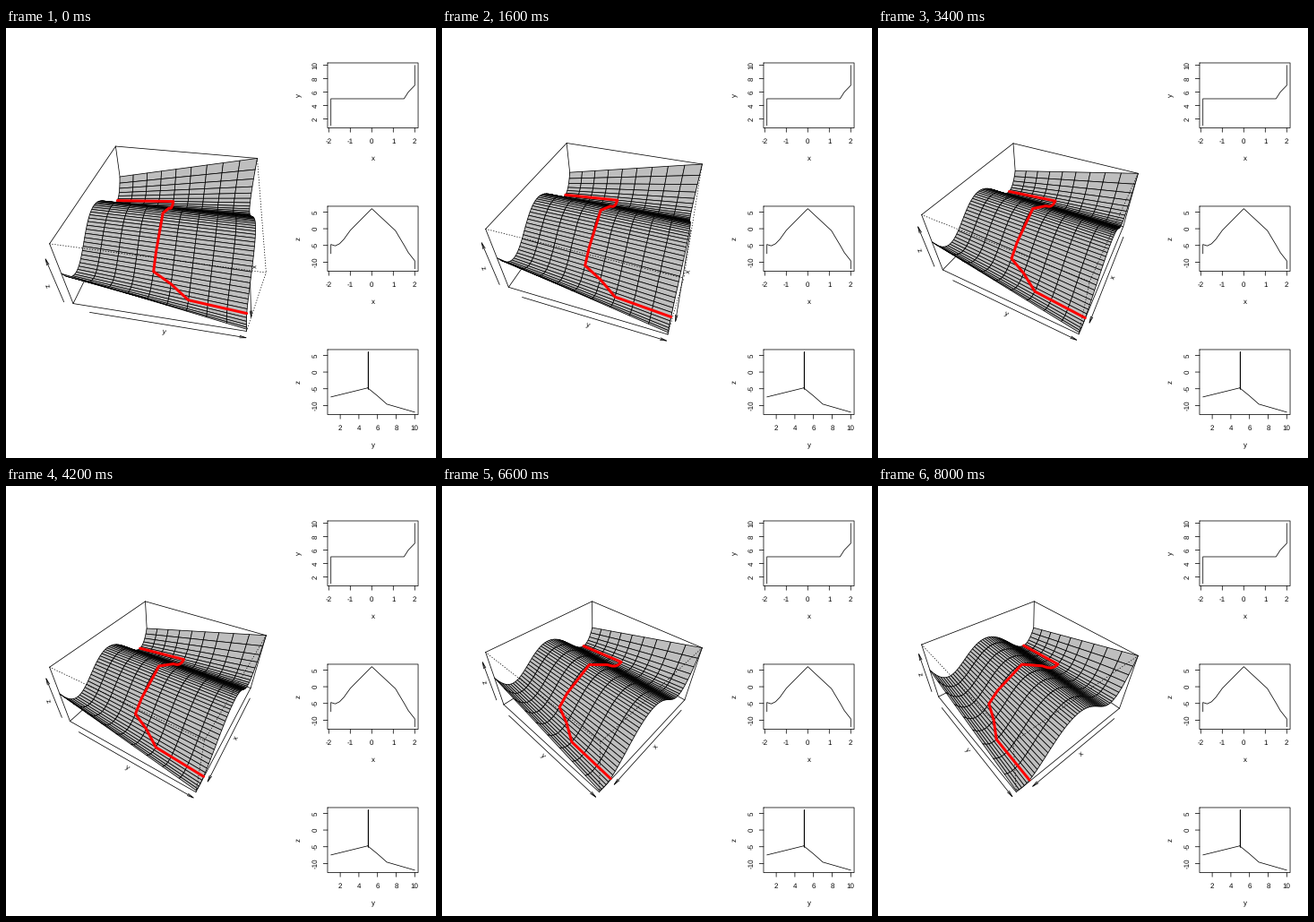
Recreate the animation shown at these times as a matplotlib script. Size 480 by 480 pixels, loop 8.2 s.

```python
import itertools

import matplotlib.pyplot as plt
import numpy as np
from matplotlib.animation import FuncAnimation
from matplotlib.collections import PolyCollection

SIZE, DPI = 480, 72
FRAMES, STEP = 41, 200
THIN = 0.75
LINE = 0.66 * 14.4            # height of one margin line
CHAR = 8                      # font size
MAR = np.array([5.1, 4.1, 4.1, 2.1]) * LINE   # bottom, left, top, right
PHI, EXPAND, EYE = np.radians(42), 0.5, 2 + np.sqrt(3)

plt.rcParams.update({"font.family": "Liberation Sans", "font.size": CHAR,
                     "text.hinting": "none", "path.snap": False,
                     "lines.scale_dashes": False})

fig = plt.figure(figsize=(SIZE / DPI, SIZE / DPI), dpi=DPI, facecolor="white")
ax = fig.add_axes([0, 0, 1, 1])
ax.set(xlim=(0, SIZE), ylim=(SIZE, 0))
ax.axis("off")


def height(x, y):
    return x**4 - 7 * x**2 + 6 + x - 0.1 * x**3 * y


gx, gy = np.linspace(-2.5, 2.5, 51), np.arange(1, 11)
GX, GY = np.meshgrid(gx, gy, indexing="ij")
GZ = height(GX, GY)
LO = np.array([gx[0], gy[0], GZ.min()])
HI = np.array([gx[-1], gy[-1], GZ.max()])

px = np.array([-1.9, -1.9, -1.7, -1.5, -1.3, -1, 0, 1.1, 1.5, 1.7, 2, 2])
py = np.array([1, 5, 5, 5, 5, 5, 5, 5, 5, 6, 7, 10])
pz = height(px, py)


def line(x=(), y=(), **kw):
    style = {"color": "black", "lw": THIN, "solid_capstyle": "round",
             "solid_joinstyle": "round"}
    return ax.plot(x, y, **{**style, **kw})[0]


def text(x, y, s, angle=0):
    return ax.text(x, y, s, ha="center", va="baseline", rotation=angle,
                   rotation_mode="anchor")


def panel(row, x, y, names, xticks, yticks):
    left, right = 320 + MAR[1], SIZE - MAR[3]
    top, bottom = 160 * row + MAR[2], 160 * (row + 1) - MAR[0]

    def scale(v, data, a, b):
        lo, hi = data.min(), data.max()
        pad = 0.04 * (hi - lo)
        return a + (np.asarray(v) - lo + pad) / (hi - lo + 2 * pad) * (b - a)

    def sx(v):
        return scale(v, x, left, right)

    def sy(v):
        return scale(v, y, bottom, top)

    line(sx(x), sy(y))
    line([left, right, right, left, left], [top, top, bottom, bottom, top])
    for v in xticks:
        line([sx(v)] * 2, [bottom, bottom + LINE / 2])
        text(sx(v), bottom + 1.8 * LINE, str(v))
    for v in yticks:
        line([left, left - LINE / 2], [sy(v)] * 2)
        text(left - 1.2 * LINE, sy(v), str(v), 90)
    text((left + right) / 2, bottom + 3.8 * LINE, names[0])
    text(left - 3.2 * LINE, (top + bottom) / 2, names[1], 90)


class View:
    """Perspective camera fitted to the left plot region."""

    def __init__(self, theta):
        self.c, self.s = np.cos(theta), np.sin(theta)
        box = self.flat(np.array(list(itertools.product(*zip(LO, HI)))))[0]
        lo, hi = box.min(0), box.max(0)
        room = np.array([320 - MAR[1] - MAR[3], SIZE - MAR[0] - MAR[2]])
        self.k = (room / (hi - lo)).min() / 1.08
        self.mid = (lo + hi) / 2
        self.center = np.array([MAR[1] + room[0] / 2, MAR[2] + room[1] / 2])

    def flat(self, p):
        x, y, z = np.moveaxis((p - (LO + HI) / 2) / ((HI - LO) / 2), -1, 0)
        z = z * EXPAND
        depth = x * self.s - y * self.c
        up = z * np.cos(PHI) - depth * np.sin(PHI)
        w = EYE - z * np.sin(PHI) - depth * np.cos(PHI)
        return np.stack([(x * self.c + y * self.s) / w, up / w], -1), w

    def __call__(self, p):
        q = (self.flat(np.asarray(p, float))[0] - self.mid) * self.k
        return self.center + q * [1, -1]


def corner(bits):
    return np.where(bits, HI, LO)


# Box edges: those meeting at the corner nearest the eye are dotted.
EDGES = [(a, b) for a, b in itertools.combinations(
    itertools.product((0, 1), repeat=3), 2) if sum(np.abs(np.subtract(a, b))) == 1]

# label, axis index, arrow ends, base corner, outward direction
AXES = [("x", 0, (-2, 2), (0, 1, 0), (0, 1, -1)),
        ("y", 1, (2, 10), (1, 0, 0), (1, 0, -1)),
        ("z", 2, (-10, 10), (1, 0, 0), (1, -1, 0))]

panel(0, px, py, "xy", range(-2, 3), range(2, 11, 2))
panel(1, px, pz, "xz", range(-2, 3), range(-10, 6, 5))
panel(2, py, pz, "yz", range(2, 11, 2), range(-10, 6, 5))

edges = [line(zorder=6, ls=(0, (THIN, 3 * THIN)), dash_capstyle="round")
         if (1, 1, 1) in e else line(zorder=2) for e in EDGES]
arrows = [(line(zorder=3), line(zorder=3), text(0, 0, a[0])) for a in AXES]
for a in arrows:
    a[2].set_zorder(3)
mesh = PolyCollection([], facecolors="#bebebe", edgecolors="black",
                      linewidths=THIN, joinstyle="round", zorder=5)
ax.add_collection(mesh)
route = line(color="red", lw=4 * THIN, zorder=7)

grid = np.stack([GX, GY, GZ], -1)
ground = np.stack([GX, GY, 0 * GZ], -1)


def cells(a):
    return np.stack([a[:-1, :-1], a[1:, :-1], a[1:, 1:], a[:-1, 1:]], 2)


def draw_axis(view, parts, spec):
    _, k, ends, base, out = spec
    shift = np.array(out) * (HI - LO) * 0.03
    p = np.array([corner(base) + shift] * 2)
    p[:, k] = ends
    a, b = view(p)
    shaft, head, label = parts
    shaft.set_data(*np.array([a, b]).T)
    back = np.arctan2(*(a - b)[::-1]) + np.radians([10, -10])
    barbs = b + 7.2 * np.stack([np.cos(back), np.sin(back)], -1)
    head.set_data(*np.array([barbs[0], b, barbs[1]]).T)
    dx, dy = (b - a) if b[0] > a[0] else (a - b)
    tilt = np.arctan2(-dy, dx)
    drop = 0.36 * CHAR * np.array([np.sin(tilt), np.cos(tilt)])
    label.set_position(view(p.mean(0) + shift) + drop)
    label.set_rotation(np.degrees(tilt))


def update(i):
    view = View(np.radians(100 + i))
    for artist, (a, b) in zip(edges, EDGES):
        artist.set_data(*view([corner(a), corner(b)]).T)
    for parts, spec in zip(arrows, AXES):
        draw_axis(view, parts, spec)
    quads = cells(view(grid)).reshape(-1, 4, 2)
    far = cells(view.flat(ground)[1]).reshape(-1, 4).max(1)
    mesh.set_verts(quads[np.argsort(-far, kind="stable")])
    route.set_data(*view(np.stack([px, py, pz], -1)).T)
    return []


anim = FuncAnimation(fig, update, frames=FRAMES, interval=STEP, repeat=True,
                     repeat_delay=0)
plt.show()
```
